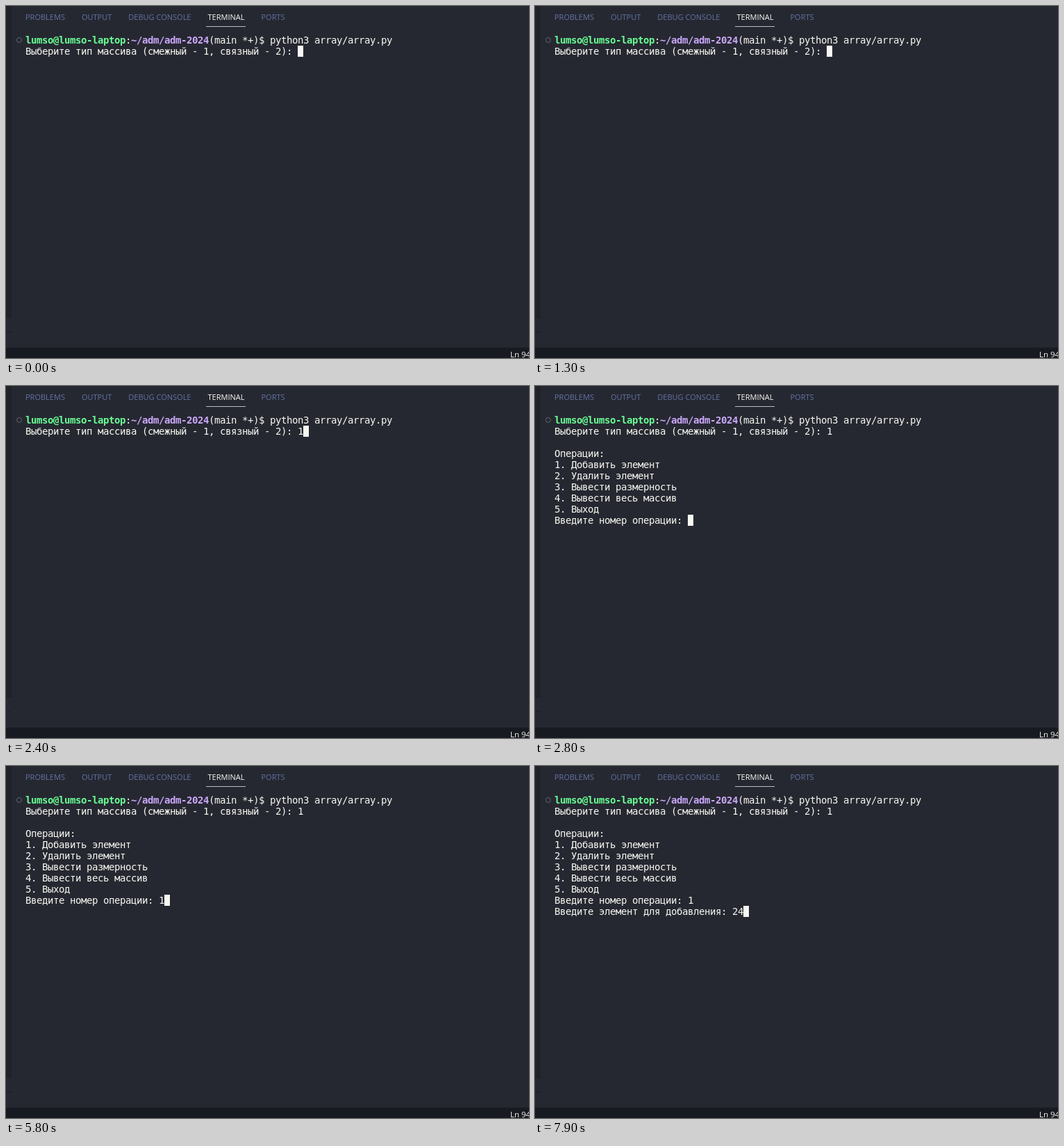
Recreate the animation shown at these times as an HTML page. Size 753 by 506 pixels, loop 8 s.

```html
<!DOCTYPE html>
<html lang="ru">
<head>
<meta charset="utf-8">
<title>Terminal session</title>
<style>
  html, body { margin: 0; width: 100%; height: 100%; overflow: hidden; background: #262831; }
  .stage { position: relative; width: 753px; height: 506px; overflow: hidden; }
  .stage > * { position: absolute; }

  .sidebar { left: 0; top: 0; width: 8px; height: 447px; background: #20222a; }
  .row { left: 0; top: 447px; width: 8px; height: 22px; border: solid #1b1d24; border-width: 1px 0; box-sizing: border-box; }
  .status {
    left: 0; top: 491px; width: 753px; height: 15px; background: #181a21;
    color: #f8f8f2; font: 11.5px/20px "Open Sans", sans-serif;
    white-space: nowrap; text-indent: 726px; overflow: hidden;
  }

  .tabs {
    left: 28px; top: 3px; display: flex; gap: 24px;
    font: 11px/26px "Open Sans", sans-serif; color: #6272a4; white-space: nowrap;
  }
  .active { position: relative; color: #f8f8f2; }
  .active::after { content: ""; position: absolute; left: -2px; right: -2px; top: 26px; height: 1px; background: #b9bbbd; }

  .mark { left: 15px; top: 45px; width: 8px; height: 8px; box-sizing: border-box; border: 1.5px solid #62646d; border-radius: 50%; }

  /* The terminal grid uses cells of 8 by 16 px. */
  .term {
    left: 28px; top: 41px; margin: 0; color: #f8f8f2;
    font: 14px/16px "DejaVu Sans Mono", monospace; letter-spacing: calc(8px - 1ch);
    font-variant-ligatures: none;
  }
  .user { color: #69ff94; }
  .path { color: #cba8fb; }

  .cursor { left: 28px; top: 41px; width: 8px; height: 16px; background: #f8f8f2; animation: cursor 8s step-end infinite; }
  .on { animation: 8s step-end infinite; }
  .type { animation-name: type; }
  .menu { animation-name: menu; }
  .choice { animation-name: choice; }
  .ask { animation-name: ask; }
  .digit1 { animation-name: digit1; }
  .digit2 { animation-name: digit2; }

  @keyframes type { 0% { visibility: hidden; } 28.75%, 100% { visibility: visible; } }
  @keyframes menu { 0% { visibility: hidden; } 35%, 100% { visibility: visible; } }
  @keyframes choice { 0% { visibility: hidden; } 72.5%, 100% { visibility: visible; } }
  @keyframes ask { 0% { visibility: hidden; } 80%, 100% { visibility: visible; } }
  @keyframes digit1 { 0% { visibility: hidden; } 93.75%, 100% { visibility: visible; } }
  @keyframes digit2 { 0% { visibility: hidden; } 98.75%, 100% { visibility: visible; } }
  @keyframes cursor {
    0% { transform: translate(392px, 16px); }
    28.75% { transform: translate(400px, 16px); }
    35% { transform: translate(192px, 144px); }
    72.5% { transform: translate(200px, 144px); }
    80% { transform: translate(256px, 160px); }
    93.75% { transform: translate(264px, 160px); }
    98.75%, 100% { transform: translate(272px, 160px); }
  }
</style>
</head>
<body>
<div class="stage">
  <div class="sidebar"></div>
  <div class="row"></div>
  <div class="tabs">
    <span>PROBLEMS</span><span>OUTPUT</span><span>DEBUG CONSOLE</span><span class="active">TERMINAL</span><span>PORTS</span>
  </div>
  <div class="mark"></div>
  <pre class="term"><b class="user">lumso@lumso-laptop</b>:<b class="path">~/adm/adm-2024</b>(main *+)$ python3 array/array.py
Выберите тип массива (смежный - 1, связный - 2): <span class="on type">1</span>
<span class="on menu">
Операции:
1. Добавить элемент
2. Удалить элемент
3. Вывести размерность
4. Вывести весь массив
5. Выход
Введите номер операции: </span><span class="on choice">1</span>
<span class="on ask">Введите элемент для добавления: </span><span class="on digit1">2</span><span class="on digit2">4</span></pre>
  <div class="cursor"></div>
  <div class="status">Ln 94</div>
</div>
</body>
</html>
```
